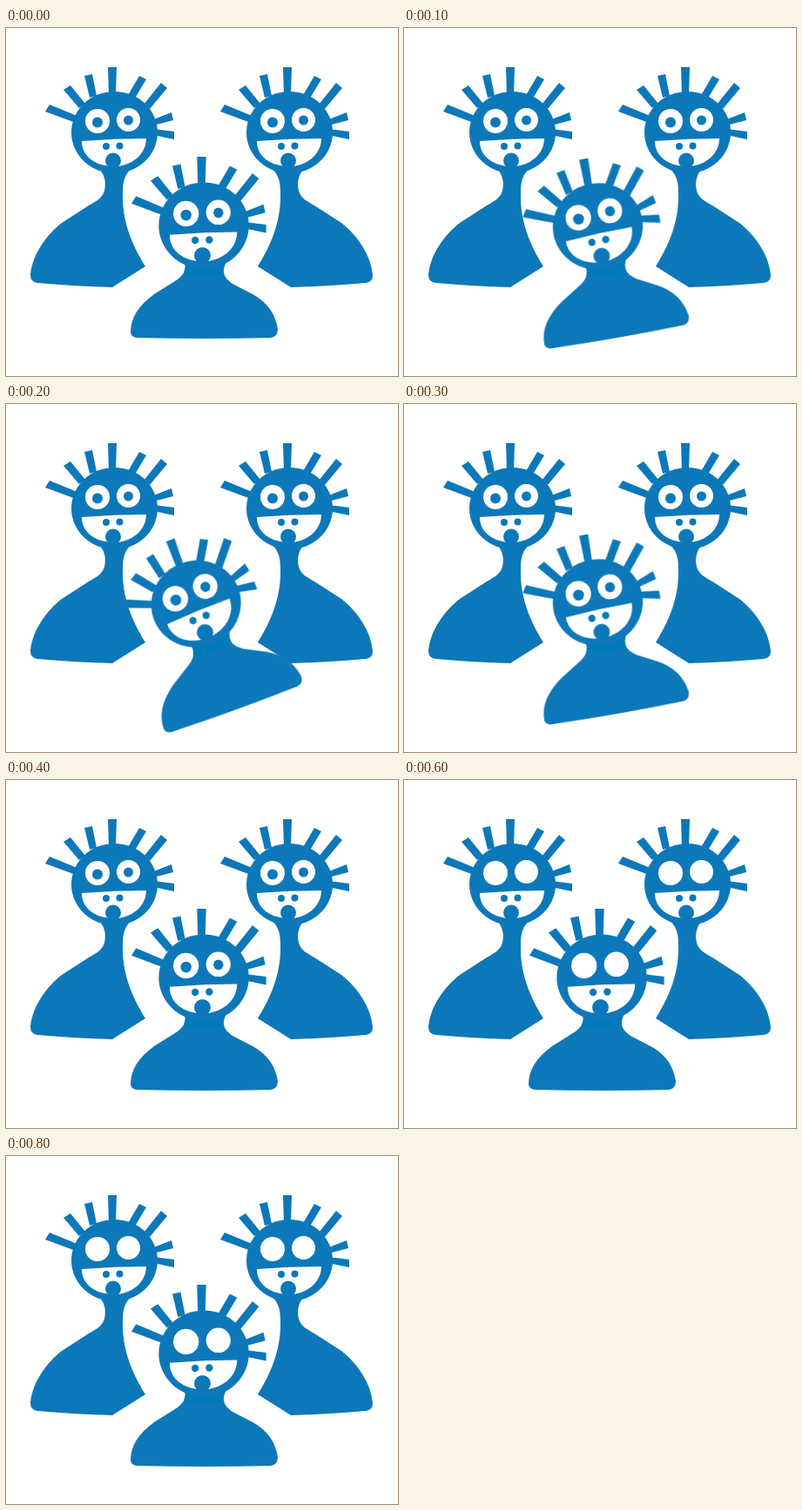
An HTML page that plays this animation: 450 by 400 pixels, repeating every 900 ms.

```html
<!DOCTYPE html>
<html lang="en">
<head>
<meta charset="utf-8">
<title>Three rocking figures</title>
<style>
  html, body { margin: 0; width: 100%; height: 100%; overflow: hidden; background: #fff; }
  svg { display: block; width: 450px; height: 400px; fill: #0d78b9; }
  .white { fill: #fff; }
  .collar { fill: #007ab8; }
  .rock {
    transform-origin: 230px 253.5px;
    animation: rock 900ms step-end infinite;
  }
  .pupils { animation: blink 900ms step-end infinite; }

  @keyframes rock {
    0%      { transform: rotate(0deg); }
    11.11%  { transform: rotate(-10deg); }
    22.22%  { transform: rotate(-20deg); }
    33.33%  { transform: rotate(-10deg); }
    44.44%  { transform: rotate(0deg); }
    55.55%  { transform: rotate(-10deg); }
    66.66%, 100% { transform: rotate(0deg); }
  }
  @keyframes blink {
    0%     { visibility: visible; }
    66.66% { visibility: hidden; }
    77.77% { visibility: visible; }
    88.88%, 100% { visibility: hidden; }
  }
</style>
</head>
<body>
<svg viewBox="0 0 450 400">
  <defs>
    <g id="head">
      <path d="M50 88L45 96L80 109L84 102Z
               M66 71L74 66L91 87L84 92Z
               M90 55L99 53L104 78L96 80Z
               M117 45L127 45L126 78L118 78Z
               M153 55L161 59L146 84L139 79Z
               M178 63L185 69L165 93L158 88Z
               M190 97L192 106L169 112L167 106Z
               M193 119L193 128L169 123L169 116Z"/>
      <ellipse cx="124.5" cy="120" rx="49.5" ry="47"/>
      <g class="white">
        <circle cx="105" cy="107" r="14"/>
        <circle cx="140.5" cy="105.5" r="13.5"/>
        <path d="M87 130Q124 127 161 127C161 146 143 159 124 159C103 159 87 148 87 130Z"/>
      </g>
      <circle cx="115" cy="136" r="4"/>
      <circle cx="130.5" cy="135.5" r="4"/>
      <circle cx="123" cy="152.500" r="9"/>
    </g>
    <g id="pupils">
      <circle cx="105" cy="108.500" r="6"/>
      <circle cx="140.500" cy="106" r="5.500"/>
    </g>
    <path id="body" d="M105 160C114 168 115 178 113 187C111 195 104 199 95 204L64 224
      C44 240 30 262 28 284Q28 292 36 293Q80 297 122 298L160 274
      C145 250 133 222 134 190C134 176 136 168 146 160Z"/>
  </defs>

  <g>
    <use href="#body"/>
    <use href="#head"/>
    <use href="#pupils" class="pupils"/>
  </g>

  <use href="#body" transform="matrix(-1 0 0 1 449 0)"/>
  <g transform="translate(201)">
    <use href="#head"/>
    <use href="#pupils" class="pupils"/>
  </g>

  <g class="rock">
    <path d="M203 267C208 275 206 282 197 289L170 306C152 319 143 333 143 350
      Q144 356 152 356Q228 358 304 356Q312 355 312 346
      C309 328 301 317 285 307L260 294C250 287 247 280 253 269Z"/>
    <path class="collar" d="M207 272H248L250 281Q228 292 204 281Z"/>
    <g transform="translate(144 148) scale(1.045 1.055) translate(-45 -45)">
      <use href="#head"/>
      <use href="#pupils" class="pupils"/>
    </g>
  </g>
</svg>
</body>
</html>
```
